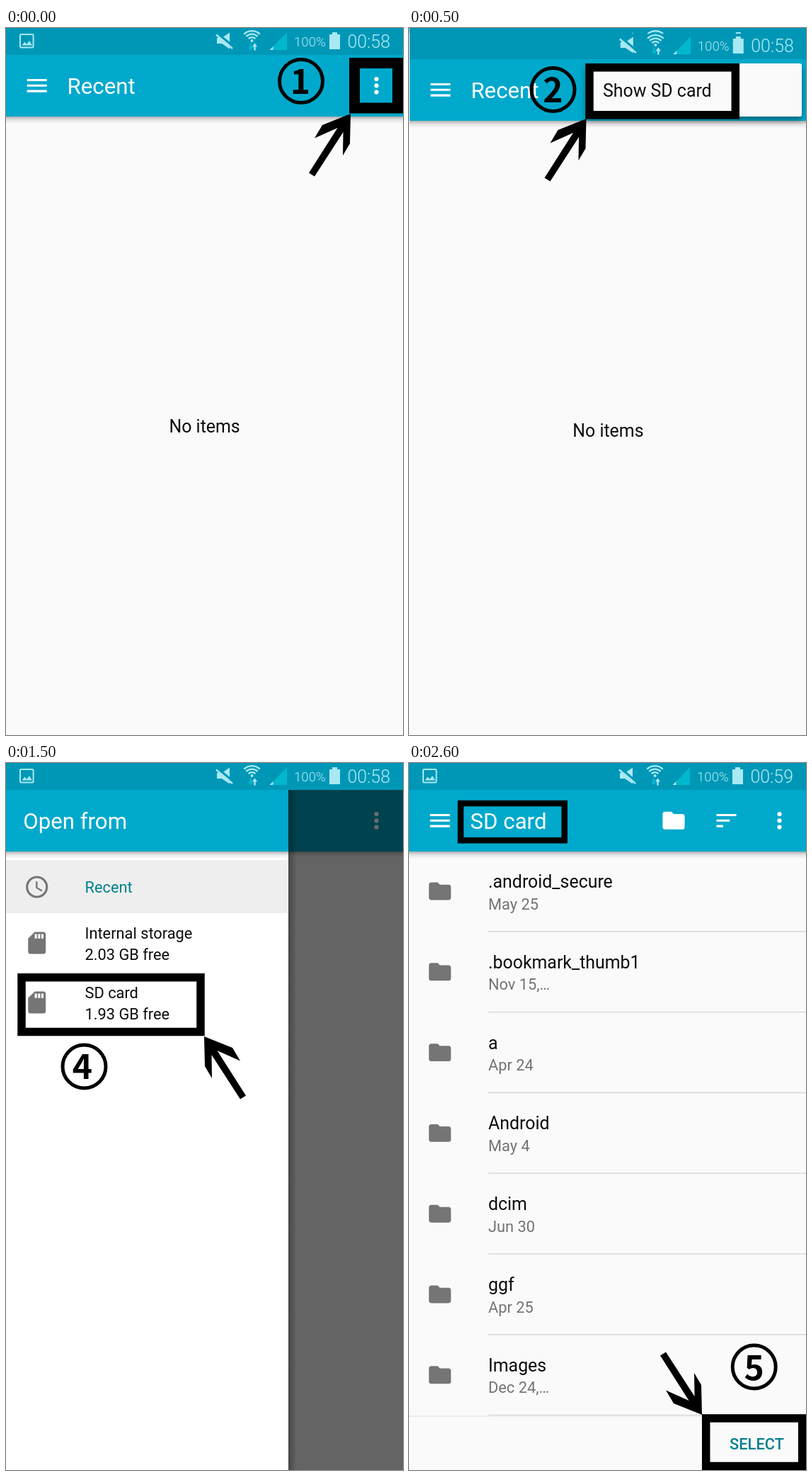
An HTML page that plays this animation: 561 by 998 pixels, repeating every 3 s.

```html
<!DOCTYPE html>
<html lang="en">
<head>
<meta charset="utf-8">
<title>Choosing the SD card</title>
<style>
html, body { margin: 0; width: 100%; height: 100%; overflow: hidden; background: #fafafa; }
svg { display: block; width: 100vw; height: 100vh; }
text { font-family: Roboto, sans-serif; font-size: 24.9px; fill: #0c0c0c; }
.title { font-size: 31.2px; fill: #fff; }
.small { font-size: 21.8px; }
.date { font-size: 21.8px; fill: #737373; }
.teal { fill: #00808c; }
.button { font-weight: 500; }
.mid, .num { text-anchor: middle; }
.status { font-weight: 300; fill: #b0eef6; }
.num { font: 700 48px "Noto Sans CJK JP", "Noto Sans CJK SC", "Open Sans", sans-serif; fill: #000; }
.frame { fill: none; stroke: #000; stroke-width: 11.5; }
.ring { fill: none; stroke: #000; stroke-width: 5; }
.pale { fill: #a8e9f3; }

/* Opaque screens are stacked; each one appears at its turn and stays until the loop ends. */
.screen { visibility: hidden; animation: 3s step-end infinite; }
#menu { animation-name: second; }
#recent { animation-name: third; }
#drawer { animation-name: fourth; }
#files { animation-name: fifth; }
@keyframes second { 0% { visibility: hidden } 16.666%, 100% { visibility: visible } }
@keyframes third { 0% { visibility: hidden } 33.333%, 100% { visibility: visible } }
@keyframes fourth { 0% { visibility: hidden } 50%, 100% { visibility: visible } }
@keyframes fifth { 0% { visibility: hidden } 66.666%, 100% { visibility: visible } }
</style>
</head>
<body>
<svg viewBox="0 0 561 998" preserveAspectRatio="none">
<defs>
  <linearGradient id="fall" x2="0" y2="1">
    <stop offset="0" stop-opacity=".3"/><stop offset=".45" stop-opacity=".1"/><stop offset="1" stop-opacity="0"/>
  </linearGradient>
  <linearGradient id="side">
    <stop offset="0" stop-opacity=".3"/><stop offset="1" stop-opacity="0"/>
  </linearGradient>
  <filter id="lift" x="-10%" y="-20%" width="120%" height="160%">
    <feDropShadow dx="0" dy="5" stdDeviation="5" flood-opacity=".4"/>
  </filter>
  <clipPath id="strip"><rect width="561" height="8"/></clipPath>

  <!-- 24-unit icons, centred on the origin -->
  <g id="burger" transform="scale(1.558) translate(-12 -12)">
    <path d="M3 18h18v-2H3zM3 13h18v-2H3zM3 6v2h18V6z"/>
  </g>
  <g id="dots"><circle cy="-9.3" r="3.1"/><circle r="3.1"/><circle cy="9.3" r="3.1"/></g>
  <g id="folder" transform="scale(1.558) translate(-12 -12)">
    <path d="M10 4H4c-1.1 0-2 .9-2 2v12c0 1.1.9 2 2 2h16c1.1 0 2-.9 2-2V8c0-1.1-.9-2-2-2h-8z"/>
  </g>
  <g id="sort" transform="scale(1.558) translate(-12 -12)">
    <path d="M3 18h6v-2H3zM3 6v2h18V6zM3 13h12v-2H3z"/>
  </g>
  <g id="card" transform="scale(1.558) translate(-12 -12)">
    <path d="M18 2h-8L4 8v12c0 1.1.9 2 2 2h12c1.1 0 2-.9 2-2V4c0-1.1-.9-2-2-2zm-6 6h-2V4h2zm3 0h-2V4h2zm3 0h-2V4h2z"/>
  </g>
  <g id="watch" transform="scale(1.558) translate(-12 -12)">
    <circle cx="12" cy="12" r="9" fill="none" stroke="#757575" stroke-width="2"/>
    <path d="M12.5 7H11v6l5.25 3.15.75-1.23-4.5-2.67z"/>
  </g>

  <!-- Arrow whose tip is the origin -->
  <path id="arrow" d="M0 0L-1 42L-11 59L-10.5 26L-51 88.5L-59 83.5L-18.5 20L-51 34.5L-40 16z"/>

  <path id="down" d="M344.5 21.5h2.4v5h2.4l-3.6 5.2l-3.6-5.2h2.4z"/>
  <path id="up" class="pale" d="M350.3 31.5h2.4v-5h2.4l-3.6-5.2l-3.6 5.2h2.4z"/>

  <g id="photo">
    <rect x="20" y="9" width="18.6" height="18.6" rx="1.5" fill="none" stroke="#a8e9f3" stroke-width="2"/>
    <path class="pale" d="M22.6 24.6l3.8-5l2.8 3.3l3.8-5l4 6.7z"/>
  </g>
  <g id="signals">
    <path class="pale" d="M298 14h7l11-7.5v23l-11-7.5h-7z"/>
    <path d="M299 7.5l22 18.5" stroke="#0097b7" stroke-width="3"/>
    <path d="M297 9.5l23 19.5" stroke="#a8e9f3" stroke-width="2.3"/>
    <g fill="none" stroke="#a8e9f3" stroke-width="2.3">
      <path d="M336.2 8.7a16 16 0 0 1 22.6 0M339.4 11.9a11.5 11.5 0 0 1 16.2 0M342.6 15.1a7 7 0 0 1 9.8 0"/>
    </g>
    <circle class="pale" cx="347.5" cy="18" r="2"/>
    <use href="#up"/>
    <path fill="#00b8ce" d="M397 6v25h-19v-5z"/>
    <path class="pale" d="M377.5 26v5h-5z"/>
    <text class="status" x="407" y="25.5" style="font-size:18.6px">100%</text>
    <path class="pale" d="M457 9h4v-3h7v3h4v21h-15z"/>
  </g>
  <g id="status">
    <rect width="561" height="38" fill="#0097b7"/>
    <use href="#signals"/>
    <use href="#down" fill="#00b8ce"/>
  </g>
  <text id="early" class="status" x="482.5" y="27.5">00:58</text>

  <g id="bar">
    <rect y="37.5" width="561" height="87.5" fill="#00a9cc"/>
    <rect y="125" width="561" height="10" fill="url(#fall)"/>
  </g>
  <g id="empty">
    <rect width="561" height="998" fill="#fafafa"/>
    <use href="#bar"/>
    <use href="#burger" x="43.7" y="81.3" fill="#fff"/>
    <text class="title" x="86.6" y="93">Recent</text>
    <text class="mid" x="280.6" y="571">No items</text>
    <use href="#status"/>
    <use href="#early"/>
  </g>
</defs>

<g id="start">
  <use href="#empty"/>
  <use href="#photo"/>
  <use href="#dots" x="523.5" y="81.3" fill="#fff"/>
  <rect class="frame" x="492.5" y="49.5" width="61" height="63.5" style="stroke-width:15"/>
  <circle class="ring" cx="417" cy="75" r="30.5"/>
  <text class="num" x="416" y="93">1</text>
  <use href="#arrow" x="487" y="121"/>
</g>

<g id="menu" class="screen">
  <rect width="561" height="998" fill="#fafafa"/>
  <rect width="561" height="8" fill="#0097b7"/>
  <use href="#empty" x=".8" y="6"/>
  <g clip-path="url(#strip)"><use href="#status" x=".8"/></g>
  <rect width=".8" height="998" fill="#fafafa" opacity=".7"/>
  <rect x="250" y="50" width="305" height="75" rx="3" fill="#fafafa" filter="url(#lift)"/>
  <text x="274" y="97">Show SD card</text>
  <rect class="frame" x="255" y="55.8" width="206.3" height="67"/>
  <circle class="ring" cx="203.5" cy="87" r="30.5"/>
  <text class="num" x="203.5" y="105">2</text>
  <use href="#arrow" x="250.5" y="128"/>
</g>

<g id="recent" class="screen">
  <rect width="561" height="998" fill="#fafafa"/>
  <g transform="translate(.8 0)">
    <use href="#empty"/>
    <use href="#photo"/>
    <use href="#down" class="pale"/>
    <use href="#dots" x="523.3" y="81.3" fill="#fff"/>
  </g>
  <rect width=".8" height="998" fill="#fafafa" opacity=".7"/>
  <rect class="frame" x="14.5" y="48.5" width="61" height="63.5" style="stroke-width:15"/>
  <circle class="ring" cx="37" cy="174.5" r="30.5"/>
  <text class="num" x="37.3" y="192.5">3</text>
  <use href="#arrow" transform="translate(82.5 120) scale(-1 1)"/>
</g>

<g id="drawer" class="screen">
  <rect width="561" height="998" fill="#646464"/>
  <rect y="37.5" width="561" height="87.5" fill="#00424f"/>
  <rect x="399" y="125" width="162" height="8" fill="url(#fall)"/>
  <use href="#dots" x="523.5" y="81.3" fill="#6c6c6c"/>
  <rect x="399" y="38" width="12" height="960" fill="url(#side)"/>
  <rect y="125" width="399" height="873" fill="#fff"/>
  <rect y="137" width="399" height="75" fill="#eee"/>
  <rect y="37.5" width="399" height="87.5" fill="#00a9cc"/>
  <rect y="125" width="399" height="10" fill="url(#fall)"/>
  <use href="#status"/>
  <use href="#early"/>
  <use href="#photo"/>
  <text class="title" x="24.3" y="93">Open from</text>
  <g fill="#757575">
    <use href="#watch" x="43.7" y="175"/>
    <use href="#card" x="43.7" y="254"/>
    <use href="#card" x="43.7" y="338"/>
  </g>
  <text class="small teal" x="111.5" y="183">Recent</text>
  <text class="small" x="111.5" y="248">Internal storage</text>
  <text class="small" x="111.5" y="278">2.03 GB free</text>
  <text class="small" x="111.5" y="332">SD card</text>
  <text class="small" x="111.5" y="362">1.93 GB free</text>
  <rect class="frame" x="22" y="302.7" width="253" height="76.8"/>
  <circle class="ring" cx="110.5" cy="428.5" r="30.5"/>
  <text class="num" x="108" y="446">4</text>
  <use href="#arrow" transform="translate(280 386) scale(-1 1)"/>
</g>

<g id="files" class="screen">
  <rect width="561" height="998" fill="#fafafa"/>
  <use href="#bar"/>
  <use href="#status"/>
  <use href="#photo"/>
  <text class="status" x="482.5" y="27.5">00:59</text>
  <g fill="#fff">
    <use href="#burger" x="43.7" y="81.3"/>
    <use href="#folder" x="374" y="81.3"/>
    <use href="#sort" x="448.5" y="81.3"/>
    <use href="#dots" x="523.5" y="81.3"/>
  </g>
  <text class="title" x="86.6" y="93">SD card</text>
  <g id="rows"></g>
  <rect y="921" width="561" height="77" fill="#fafafa"/>
  <rect y="921" width="561" height="2" fill="#ececec"/>
  <text class="small teal button mid" x="491.5" y="969">SELECT</text>
  <rect class="frame" x="73" y="57" width="146.7" height="52.2" style="stroke-width:8.5"/>
  <rect class="frame" x="419.7" y="925" width="136" height="67.5"/>
  <circle class="ring" cx="487.7" cy="852.5" r="30.5"/>
  <text class="num" x="487.7" y="870.5">5</text>
  <use href="#arrow" transform="translate(414 920) scale(1 -1)"/>
</g>
</svg>
<script>
const folders = [
  ['.android_secure', 'May 25'],
  ['.bookmark_thumb1', 'Nov 15,…'],
  ['a', 'Apr 24'],
  ['Android', 'May 4'],
  ['dcim', 'Jun 30'],
  ['ggf', 'Apr 25'],
  ['Images', 'Dec 24,…']
];
document.getElementById('rows').innerHTML = folders.map(([name, date], i) => `
  <g transform="translate(0 ${i * 113.8})">
    <use href="#folder" x="43.7" y="181" fill="#757575"/>
    <text x="112" y="176">${name}</text>
    <text class="date" x="112" y="206.5">${date}</text>
    <rect x="112" y="237" width="449" height="1.6" fill="#dadada"/>
  </g>`).join('');
</script>
</body>
</html>
```
